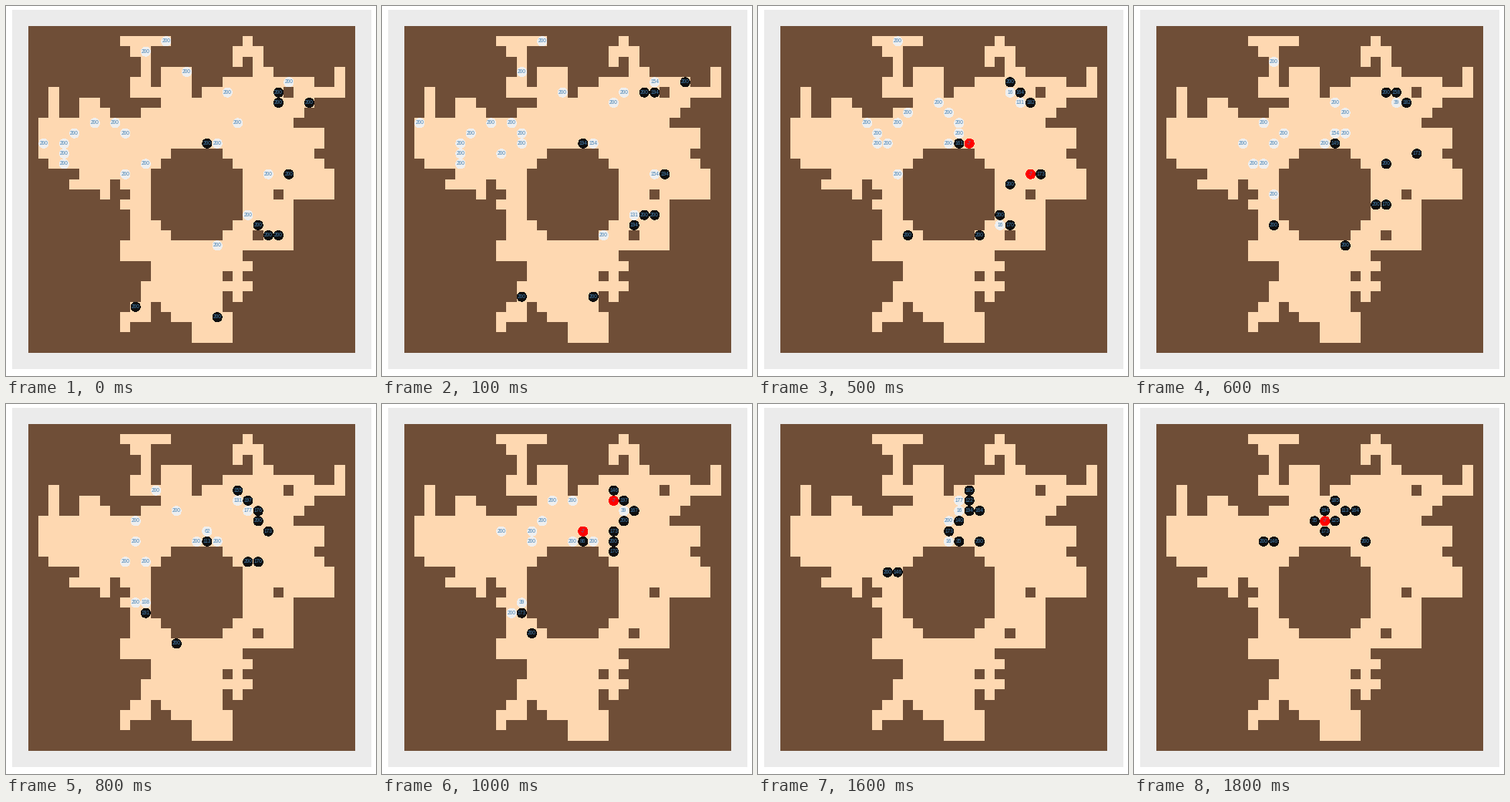
Animation of 480x480 px, one loop 3400 ms. Source, as a matplotlib script:

```python
import matplotlib.pyplot as plt
import numpy as np
from matplotlib.animation import FuncAnimation
from matplotlib.colors import ListedColormap
from matplotlib.patches import Rectangle

SIZE, DPI = 480, 80
PT = 72 / DPI                      # points per pixel
LEFT, TOP, CELL, N = 29, 26, 13.25, 32
TICKS, INTERVAL = 34, 100
MOVING_TICKS = 18

# Open floor as first-last column spans, one entry per row from row 1.
FLOOR = """
9-13 21-21|10-11 20-22|11-11 20-20 22-22|11-11 13-15 22-23 30-30
10-11 13-15 19-27 30-30|2-2 10-15 17-24 26-30|2-2 5-6 13-27|2-2 5-7 11-26
1-25|1-28|1-28|1-13 19-27|2-12 20-28|5-11 21-29|4-7 9-11 21-29
7-7 10-11 21-23 25-29|9-11 21-25|10-11 21-25|10-12 20-25
10-13 19-21 23-25|9-25|9-20|12-21|12-18 20-20|11-21|11-18 20-20
10-11 13-18|9-11 14-19|9-9 16-19|16-19
"""

# (column, row) of the two sides
GOBLINS = [(13, 1), (11, 2), (15, 4), (25, 5), (19, 6), (6, 9), (8, 9), (20, 9),
           (4, 10), (9, 10), (1, 11), (3, 11), (18, 11), (3, 12), (3, 13),
           (11, 13), (9, 14), (23, 14), (21, 18), (18, 21)]
ELVES = [(24, 6), (24, 7), (27, 7), (17, 11), (25, 14), (22, 19), (23, 20),
         (24, 20), (10, 27), (18, 28)]
POWER = {"elf": 23, "goblin": 3}
COLOR = {"elf": "#0f0f0f", "goblin": "#efefef", "dead": "#ff0000"}


def build_floor():
    floor = np.zeros((N, N), int)
    for row, spans in enumerate(FLOOR.strip().replace("\n", "|").split("|"), 1):
        for span in spans.split():
            first, last = map(int, span.split("-"))
            floor[row, first:last + 1] = 1
    return floor


class Unit:
    def __init__(self, side, col, row):
        self.side, self.pos, self.hp = side, (row, col), 200

    def look(self):
        return self.pos, self.side if self.hp > 0 else "dead", self.hp


def around(pos):
    r, c = pos
    return (r - 1, c), (r, c - 1), (r, c + 1), (r + 1, c)


def distances(start, free):
    dist, queue = {start: 0}, [start]
    for pos in queue:
        for nxt in around(pos):
            if nxt in free and nxt not in dist:
                dist[nxt] = dist[pos] + 1
                queue.append(nxt)
    return dist


def next_step(unit, foes, free):
    """First step towards the nearest square beside a foe, in reading order."""
    dist = distances(unit.pos, free)
    goals = [(dist[p], p) for foe in foes for p in around(foe.pos) if p in dist]
    if not goals:
        return unit.pos
    back = distances(min(goals)[1], free)
    return min((back[p], p) for p in around(unit.pos) if p in back)[1]


def play_round(units, floor_cells):
    """One round of moves and attacks; False once a side has been beaten."""
    for unit in sorted(units, key=lambda u: u.pos):
        if unit.hp <= 0:
            continue
        alive = [u for u in units if u.hp > 0]
        foes = [u for u in alive if u.side != unit.side]
        if not foes:
            return False
        reach = around(unit.pos)
        if not any(foe.pos in reach for foe in foes):
            unit.pos = next_step(unit, foes, floor_cells - {u.pos for u in alive})
            reach = around(unit.pos)
        near = [foe for foe in foes if foe.pos in reach]
        if near:
            min(near, key=lambda u: (u.hp, u.pos)).hp -= POWER[unit.side]
    return len({u.side for u in units if u.hp > 0}) > 1


def play_battle(floor):
    cells = {(int(r), int(c)) for r, c in np.argwhere(floor)}
    units = [Unit("goblin", *p) for p in GOBLINS] + [Unit("elf", *p) for p in ELVES]
    rounds, fighting = [[u.look() for u in units]], True
    while fighting and len(rounds) < 100:
        units = [u for u in units if u.hp > 0]
        fighting = play_round(units, cells)
        rounds.append([u.look() for u in sorted(units, key=lambda u: u.hp > 0)])
    return rounds


floor = build_floor()
rounds = play_battle(floor)

fig = plt.figure(figsize=(SIZE / DPI, SIZE / DPI), dpi=DPI, facecolor="white")
ax = fig.add_axes([0, 0, 1, 1])
ax.add_patch(Rectangle((8, 5), 466, 466, color="#ebebeb", lw=0))
ax.imshow(floor, cmap=ListedColormap(["#6f4e37", "#fed8b1"]), aspect="auto",
          interpolation="nearest", zorder=2,
          extent=(LEFT, LEFT + N * CELL, TOP + N * CELL, TOP))
ax.set(xlim=(0, SIZE), ylim=(SIZE, 0))
ax.axis("off")

dots = ax.scatter([], [], s=(12 * PT) ** 2, linewidths=0, antialiased=False, zorder=3)
labels = [ax.text(0, 0, "", family="Liberation Sans", size=6.7 * PT, color="steelblue",
                  ha="center", va="center", zorder=4)
          for _ in GOBLINS + ELVES]


def draw(tick):
    last = len(rounds) - 1
    share = min(tick / MOVING_TICKS, 1)
    looks = rounds[int(np.round(share * last))]
    centers = [(LEFT + (c + 0.5) * CELL, TOP + (r + 0.5) * CELL)
               for (r, c), _, _ in looks]
    dots.set_offsets(centers)
    dots.set_facecolor([COLOR[kind] for _, kind, _ in looks])
    for label in labels:
        label.set_text("")
    for label, center, (_, _, hp) in zip(labels, centers, looks):
        label.set_position(center)
        label.set_text(str(hp))
    return [dots, *labels]


animation = FuncAnimation(fig, draw, frames=TICKS, interval=INTERVAL, repeat=True)
plt.show()
```
